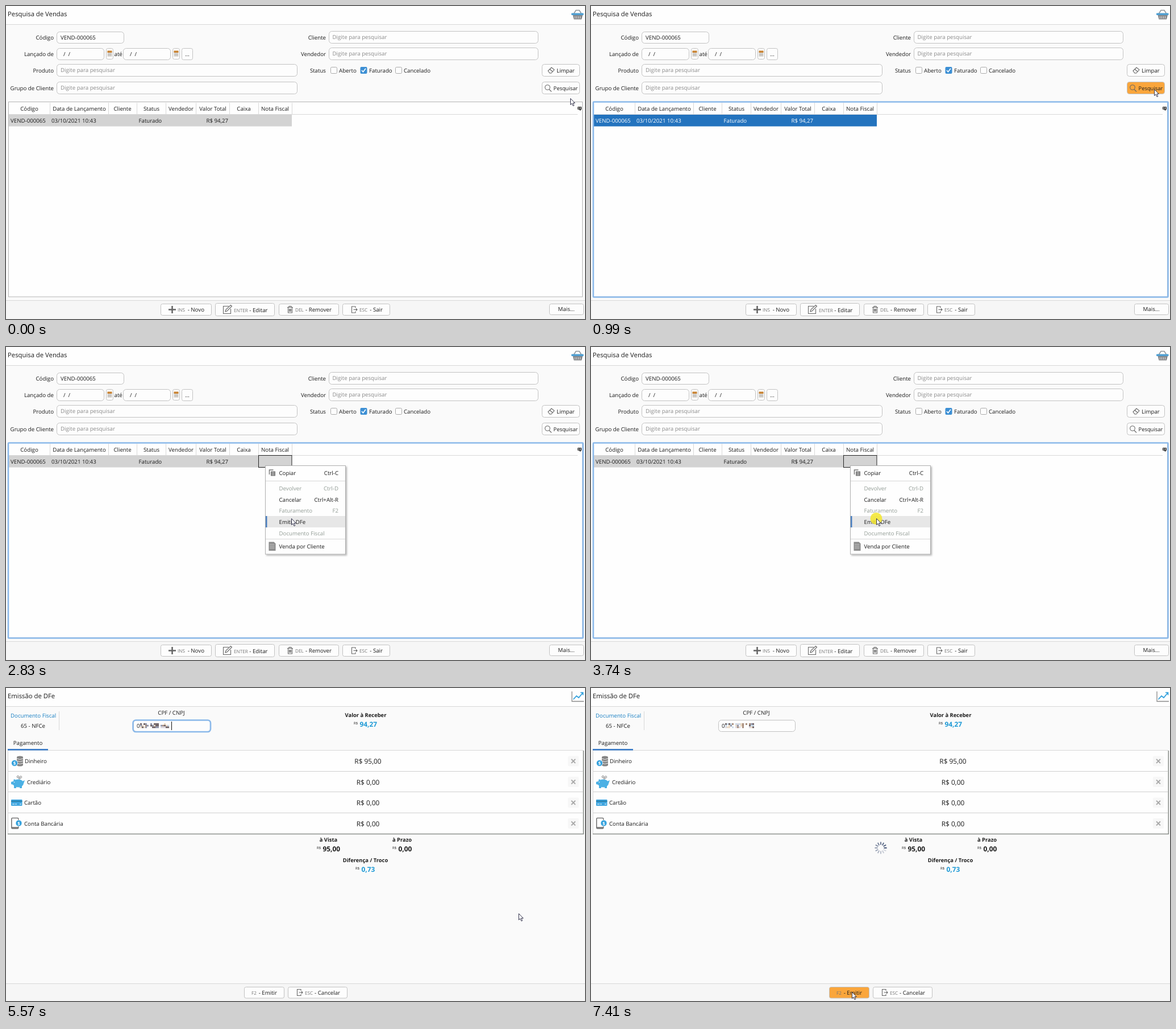
An HTML page for the animation above (8 s loop, 1019 by 550 pixels).

```html
<!DOCTYPE html>
<html lang="pt">
<head>
<meta charset="utf-8">
<title>Pesquisa de Vendas</title>
<style>
html, body { margin: 0; width: 100%; height: 100%; overflow: hidden; background: #fafafa; }
svg.stage {
  display: block; width: 1019px; height: 550px;
  font: 9.7px "Open Sans", "Noto Sans", sans-serif;
  text-rendering: geometricPrecision;
  --sales: 1; --find: #fdfdfd; --busy: 0; --focus: 0; --rowbg: #d3d3d3; --rowink: #1c1c1c;
  --menu: 0; --over: 0; --click: 0; --caret: 1; --id1: 0; --id2: 0; --id3: 0;
  --cpf: 1; --emit: #fdfdfd; --sending: 0; --mouse: 993px, 162px;
  animation: story 8s step-end infinite;
}
@keyframes story {
  0% { --sales: 1; --find: #fdfdfd; --busy: 0; --focus: 0; --rowbg: #d3d3d3; --rowink: #1c1c1c;
    --menu: 0; --over: 0; --click: 0; --caret: 1; --id1: 0; --id2: 0; --id3: 0;
    --cpf: 1; --emit: #fdfdfd; --sending: 0; --mouse: 993px, 162px; }
  .875% { --find: #faa63c; --busy: 1; --mouse: 991px, 146px; }
  12.375% { --busy: 0; --focus: 1; --rowbg: #2373be; --rowink: #fff; }
  23.875% { --find: #fdfdfd; --rowbg: #d3d3d3; --rowink: #1c1c1c; --menu: 1; --mouse: 456px, 208px; }
  35.375% { --over: 1; --mouse: 502px, 301px; }
  46.75% { --click: 1; }
  58.25% { --sales: 0; --click: 0; }
  69.625% { --caret: 0; --id1: 1; --mouse: 902px, 396px; }
  81.125% { --id1: 0; --id2: 1; --emit: #faa63c; --mouse: 460px, 528px; }
  92.625% { --id2: 0; --id3: 1; --cpf: 0; --sending: 1; --mouse: 459px, 534px; }
}
text { fill: #1c1c1c; }
.title { font-size: 11.3px; }
.e { text-anchor: end; }
.m { text-anchor: middle; }
.key { font-size: 8.2px; fill: #777; }
.hint { fill: #8b8b8b; }
.off { fill: #929c95; }
.box { fill: #fdfdfd; stroke: #c2c2c2; }
.rule { stroke: #d8d8d8; fill: none; }
.ring { fill: none; stroke: #8bb9ea; stroke-width: 2.6; }
.ico { fill: none; stroke: #666; stroke-width: 1.1; }
.row text { fill: var(--rowink); }
.b { font-weight: 700; font-size: 9.4px; text-anchor: middle; }
.sum { font-weight: 700; font-size: 11.9px; }
.cur { font-size: 6px; }
.val { font-size: 11.9px; text-anchor: middle; }
.blue { fill: #1e9ad6; }
.mouse { transform: translate(var(--mouse)); }
.spin line { stroke: #34466b; stroke-width: 2; stroke-linecap: round; }
</style>
</head>
<body>
<svg class="stage" viewBox="0 0 1019 550">
<defs>
  <g id="cal">
    <rect class="box" x=".5" y=".5" width="12" height="19" rx="3"/>
    <rect x="2.5" y="5" width="8" height="10" fill="#d9d5d0"/>
    <rect x="2.5" y="4.500" width="8" height="3.500" fill="#c98332"/>
    <path d="M3 10.500h7M3 12.500h7" stroke="#aaa" stroke-width=".6"/>
  </g>
  <g id="exit" class="ico">
    <path d="M7 3V.5H.5v11H7V9M3.500 6H10M8 4l2 2-2 2"/>
  </g>
  <g id="close">
    <rect x="-9.500" y="-9" width="19" height="18" rx="2" fill="#f7f7f7"/>
    <path d="M-3.500-3.500l7 7m0-7l-7 7" stroke="#a9a9a9" stroke-width="1.800"/>
  </g>
  <g id="coin">
    <circle r="5.500" fill="#2f9fdc" stroke="#fff" stroke-width=".8"/>
    <text y="3" class="m" style="fill:#fff;font-size:8px;font-weight:700">$</text>
  </g>
  <filter id="soft" x="-10%" y="-10%" width="125%" height="125%">
    <feDropShadow dx="2" dy="2" stdDeviation="1.500" flood-opacity=".28"/>
  </filter>
</defs>

<rect width="1019" height="550" fill="#fafafa"/>
<rect width="1019" height="32" fill="#fefefe"/>
<path class="rule" d="M0 32.500H1019"/>

<g style="opacity:var(--sales)">
  <text class="title" x="3" y="17.500">Pesquisa de Vendas</text>
  <path d="M999 14l4-6.500h6l4 6.500" fill="none" stroke="#8e959b" stroke-width="1.500"/>
  <path d="M997.500 16h17.500l-2 7.500h-13.500z" fill="#87898c"/>
  <path d="M1001.500 18v4m3-4v4m3-4v4m3-4v4" stroke="#dedede"/>
  <rect x="995" y="12.500" width="21.500" height="3.500" rx="1" fill="#4f9fd2"/>

  <g class="e">
    <text x="84" y="58.500">Código</text>
    <text x="84" y="87.500">Lançado de</text>
    <text x="84" y="116.500">Produto</text>
    <text x="84" y="147.500">Grupo de Cliente</text>
    <text x="563" y="58.500">Cliente</text>
    <text x="563" y="87.500">Vendedor</text>
    <text x="563" y="116.500">Status</text>
  </g>
  <g class="box">
    <rect x="89.500" y="45.500" width="118" height="20" rx="5"/>
    <rect x="89.500" y="74.500" width="83" height="20" rx="5"/>
    <rect x="206.500" y="74.500" width="83" height="20" rx="5"/>
    <rect x="309.500" y="74.500" width="19" height="20" rx="3"/>
    <rect x="89.500" y="102.500" width="423" height="21" rx="5"/>
    <rect x="89.500" y="133.500" width="423" height="21" rx="5"/>
    <rect x="568.500" y="44.500" width="368" height="21" rx="5"/>
    <rect x="568.500" y="73.500" width="368" height="21" rx="5"/>
    <rect x="943.500" y="102.500" width="66" height="21" rx="4"/>
    <rect x="943.500" y="133.500" width="66" height="21" rx="4" style="fill:var(--find)"/>
    <rect x="571.500" y="107.500" width="11" height="11" rx="2" stroke="#aaa"/>
    <rect x="685.500" y="107.500" width="11" height="11" rx="2" stroke="#aaa"/>
  </g>
  <rect x="623.500" y="107" width="12" height="12" rx="2" fill="#3c8fd4"/>
  <path d="M626 113l2.500 2.800 4.500-6" fill="none" stroke="#fff" stroke-width="1.600"/>
  <use href="#cal" x="176" y="74"/>
  <use href="#cal" x="293" y="74"/>

  <text x="96" y="58.500">VEND-000065</text>
  <text x="101" y="88">/&#160;&#160;/</text>
  <text x="218" y="88">/&#160;&#160;/</text>
  <text x="190.500" y="87.500">até</text>
  <text class="m" x="319" y="87.500">...</text>
  <g>
    <text class="hint" x="96" y="116">Digite para pesquisar</text>
    <text class="hint" x="96" y="147">Digite para pesquisar</text>
    <text class="hint" x="574.500" y="58">Digite para pesquisar</text>
    <text class="hint" x="574.500" y="87">Digite para pesquisar</text>
  </g>
  <text x="586" y="116.500">Aberto</text>
  <text x="639" y="116.500">Faturado</text>
  <text x="700" y="116.500">Cancelado</text>
  <path class="ico" d="M954 114l6-6 5 4-5.500 6h-2.500zM957 111l5 4.500"/>
  <text x="969" y="116.500">Limpar</text>
  <g class="ico"><circle cx="953" cy="143" r="4.300"/><path d="M956 146.500l4 4"/></g>
  <text x="963.500" y="147.500" font-size="9.400">Pesquisar</text>

  <rect x="4.500" y="168.500" width="1010" height="342.500" fill="#fefefe" stroke="#b4b4b4"/>
  <rect x="5" y="191" width="498" height="20.500" style="fill:var(--rowbg)"/>
  <path class="rule" d="M5 190.500H1006M77.500 170v20M180.500 170v20M230.500 170v20M281.500 170v20M334.500 170v20M393.500 170v20M444.500 170v20M503.500 170v20"/>
  <g class="m">
    <text x="41" y="184">Código</text>
    <text x="129" y="184">Data de Lançamento</text>
    <text x="205" y="184">Cliente</text>
    <text x="256" y="184">Status</text>
    <text x="308" y="184">Vendedor</text>
    <text x="364" y="184">Valor Total</text>
    <text x="418.500" y="184">Caixa</text>
    <text x="473.500" y="184">Nota Fiscal</text>
  </g>
  <g class="row">
    <text x="8" y="205">VEND-000065</text>
    <text x="80" y="205">03/10/2021 10:43</text>
    <text x="233.500" y="205">Faturado</text>
    <text class="e" x="391" y="205">R$ 94,27</text>
  </g>
  <path d="M1006.500 177.500h6v4h-6zM1006.500 179.500h6M1009.500 177v4" fill="none" stroke="#222"/>
  <path d="M1008 181h5l-2.500 3z" fill="#222"/>
  <rect class="ring" x="4" y="168.500" width="1011.500" height="343" rx="1" style="opacity:var(--focus)"/>

  <rect y="517" width="1019" height="33" fill="#f6f6f6"/>
  <path class="rule" d="M0 517.500H1019"/>
  <g class="box">
    <rect x="272.500" y="523.500" width="89" height="20" rx="3"/>
    <rect x="368.500" y="522.500" width="104" height="22" rx="3"/>
    <rect x="480.500" y="523.500" width="105" height="20" rx="3"/>
    <rect x="592.500" y="523.500" width="83" height="20" rx="3"/>
    <rect x="956.500" y="523.500" width="60" height="19" rx="3"/>
  </g>
  <path d="M286 533.500h13M292.500 527v13" stroke="#666" stroke-width="2.600"/>
  <path class="ico" d="M392 527.500h-9.500v13h13V532M386 537l1-3.500 8.500-8 2 2-8.500 8.500z"/>
  <path class="ico" d="M495 529.500h10M498 529v-1.500h4v1.500M496.500 530v9h7v-9M498.500 532v5m1.500-5v5m1.500-5v5"/>
  <use href="#exit" x="608" y="527.500"/>
  <text class="key" x="302" y="537">INS</text>
  <text class="key" x="401" y="537.500">ENTER</text>
  <text class="key" x="509" y="537">DEL</text>
  <text class="key" x="622" y="537">ESC</text>
  <g class="e">
    <text x="349" y="537">- Novo</text>
    <text x="460.500" y="537.500">- Editar</text>
    <text x="573" y="537">- Remover</text>
    <text x="663" y="537">- Sair</text>
    <text x="1000.500" y="536">Mais...</text>
  </g>
  <g style="opacity:var(--busy)"><g class="spin" transform="translate(510 265)"></g></g>

  <g style="opacity:var(--menu)">
    <rect x="444.500" y="190.500" width="58.500" height="21" fill="none" stroke="#222"/>
    <rect x="456.500" y="208.500" width="141" height="155.500" fill="#fefefe" stroke="#b0b0b0" filter="url(#soft)"/>
    <g style="opacity:var(--over)">
      <rect x="457" y="297" width="140" height="20" fill="#e7e7e7"/>
      <rect x="457" y="297" width="2.500" height="20" fill="#4a7fc0"/>
    </g>
    <path class="rule" d="M457 235.500h140M457 337.500h140"/>
    <path d="M463.500 224v-8h7" fill="none" stroke="#777" stroke-width="1.500"/>
    <rect x="466" y="218.500" width="8" height="8" fill="#777"/>
    <path d="M467.500 220.500h5m-5 2h5m-5 2h5" stroke="#ddd" stroke-width=".7"/>
    <path d="M462.500 342.500h9l3 3v12.500h-12z" fill="#8a8a8a"/>
    <path d="M464 346.500h8.500m-8.500 2.500h8.500m-8.500 2.500h8.500m-8.500 2.500h8.500" stroke="#d5d5d5" stroke-width=".8"/>
    <text x="480.500" y="225">Copiar</text>
    <text class="off" x="480.500" y="252">Devolver</text>
    <text x="480.500" y="271.500">Cancelar</text>
    <text class="off" x="480.500" y="291">Faturamento</text>
    <text x="480.500" y="310.500">Emitir DFe</text>
    <text class="off" x="480.500" y="330.500">Documento Fiscal</text>
    <text x="480.500" y="354">Venda por Cliente</text>
    <g class="e">
      <text x="585" y="225">Ctrl-C</text>
      <text class="off" x="585" y="252">Ctrl-D</text>
      <text x="585" y="271.500">Ctrl+Alt-R</text>
      <text class="off" x="585" y="291">F2</text>
    </g>
  </g>
</g>

<g style="opacity:calc(1 - var(--sales))">
  <text class="title" x="3" y="17.500">Emissão de DFe</text>
  <path d="M996 6v17.500h21" fill="none" stroke="#8a8a8a" stroke-width="1.300"/>
  <path d="M998.500 20l5.500-6 4 3 7-8.500M1011 8h4.500v4.500" fill="none" stroke="#2f9fdc" stroke-width="1.700"/>
  <text x="8" y="52" style="fill:#1a80c4">Documento Fiscal</text>
  <text class="m" x="47.500" y="70">65 - NFCe</text>
  <path class="rule" d="M93.500 41v33"/>
  <text class="m" x="291" y="47">CPF / CNPJ</text>
  <rect class="box" x="224.500" y="56.500" width="135" height="20" rx="5"/>
  <rect class="ring" x="223.500" y="56.500" width="136.500" height="20.500" rx="5" style="opacity:var(--cpf)"/>
  <path d="M230.500 59v15" stroke="#111" style="opacity:var(--caret)"/>
  <text x="230" y="70" style="opacity:calc(1 - var(--caret))">0</text>
  <g class="mosaic" style="opacity:var(--id1)"><path d="M291.500 59v15" stroke="#111"/></g>
  <g class="mosaic" style="opacity:var(--id2)"></g>
  <g class="mosaic" style="opacity:var(--id3)"></g>

  <text class="b" x="633" y="51">Valor à Receber</text>
  <text class="cur" x="612" y="64">R$</text>
  <text class="sum blue" x="622.500" y="68">94,27</text>
  <text class="m" x="38.500" y="100">Pagamento</text>

  <rect x="3" y="110" width="1013" height="146" fill="#fefefe"/>
  <path class="rule" d="M3 109.500H1016M3.500 110v146"/>
  <path d="M4 146.500H1015M4 182.500H1015M4 219.500H1015" stroke="#cfcfcf"/>
  <path d="M3 256.500H1016.300V110" fill="none" stroke="#8b8f8b" stroke-width="1.600"/>
  <rect x="3" y="107" width="71" height="2.600" fill="#3b7cc9"/>

  <path d="M24.500 122v13" stroke="#858585" stroke-width="11"/>
  <ellipse cx="24.500" cy="121.500" rx="5.500" ry="2" fill="#858585"/>
  <ellipse cx="24.500" cy="135.500" rx="5.500" ry="2" fill="#858585"/>
  <path d="M19 124q5.500 3 11 0m-11 4q5.500 3 11 0m-11 4q5.500 3 11 0" fill="none" stroke="#eee"/>
  <use href="#coin" x="15" y="132"/>
  <ellipse cx="21.500" cy="167.500" rx="9.500" ry="7" fill="#4bb0e4"/>
  <path d="M9 165l4-1 1-4 5 3v8l-3 1-3-2-4-1zM14 171h4v5h-4zM24 171h4v5h-4zM29 164l4-2-2 6z" fill="#4bb0e4"/>
  <circle cx="14.500" cy="165.500" r=".8" fill="#fff"/>
  <g fill="none" stroke="#858585"><circle cx="21" cy="156" r="1.700"/><circle cx="26" cy="156.500" r="1.700"/><circle cx="23.500" cy="159" r="1.200"/></g>
  <rect x="9" y="196" width="19.500" height="11" rx="1" fill="#3fa5df"/>
  <path d="M9 199h19.500" stroke="#24779f" stroke-width="1.600"/>
  <path d="M11 204h4m1 0h3m5 0h3" stroke="#fff"/>
  <rect x="9.800" y="228.500" width="12" height="18.500" rx="1.500" fill="#fff" stroke="#777" stroke-width="1.600"/>
  <path d="M10 245.500h12" stroke="#777" stroke-width="2.500"/>
  <use href="#coin" x="22.500" y="237.500"/>

  <text x="33" y="132">Dinheiro</text>
  <text x="37" y="168.500">Crediário</text>
  <text x="32" y="205">Cartão</text>
  <text x="32" y="241.500">Conta Bancária</text>
  <text class="val" x="637" y="133">R$ 95,00</text>
  <text class="val" x="637" y="169.500">R$ 0,00</text>
  <text class="val" x="637" y="206">R$ 0,00</text>
  <text class="val" x="637" y="242.500">R$ 0,00</text>
  <use href="#close" x="998.500" y="128.500"/>
  <use href="#close" x="998.500" y="165"/>
  <use href="#close" x="998.500" y="201.500"/>
  <use href="#close" x="998.500" y="238"/>

  <text class="b" x="567.500" y="270">à Vista</text>
  <text class="cur" x="547" y="283">R$</text>
  <text class="sum" x="557.500" y="287">95,00</text>
  <text class="b" x="697" y="270">à Prazo</text>
  <text class="cur" x="680" y="283">R$</text>
  <text class="sum" x="690.500" y="287">0,00</text>
  <text class="b" x="632.500" y="306">Diferença / Troco</text>
  <text class="cur" x="615" y="319">R$</text>
  <text class="sum blue" x="625.500" y="323">0,73</text>

  <rect y="519" width="1019" height="31" fill="#f6f6f6"/>
  <path class="rule" d="M0 519.500H1019"/>
  <rect class="box" x="419.500" y="525.500" width="70" height="19.500" rx="3" style="fill:var(--emit)"/>
  <rect class="box" x="496.500" y="525.500" width="104" height="19.500" rx="3"/>
  <text class="key" x="432" y="538.500">F2</text>
  <text class="e" x="477" y="538.500">- Emitir</text>
  <use href="#exit" x="512" y="529"/>
  <text class="key" x="526" y="538.500">ESC</text>
  <text class="e" x="588" y="538.500">- Cancelar</text>
  <g style="opacity:var(--sending)"><g class="spin" transform="translate(510 281)"></g></g>
</g>

<circle cx="502" cy="301.500" r="10.500" fill="#f3e62b" style="opacity:calc(var(--click) * .85)"/>
<path class="mouse" d="M.5.500V11.500L3 9.200l2 4.300 1.800-.8-1.900-4.200H8.300z" fill="#fff" stroke="#20203c" stroke-width=".9"/>
</svg>
<script>
const add = (parent, tag, attrs) => {
  const el = document.createElementNS("http://www.w3.org/2000/svg", tag);
  for (const k in attrs) el.setAttribute(k, attrs[k]);
  parent.append(el);
};

// Twelve spokes fading behind the leading one
for (const g of document.querySelectorAll(".spin"))
  for (let i = 0; i < 12; i++)
    add(g, "line", { y1: -6.2, y2: -9.8, transform: `rotate(${90 - i * 30})`, opacity: 0.9 - i * 0.065 });

// Blurred digits as seeded blocks
const tints = ["#6b5f62", "#a58a78", "#c8d9e8", "#e9d8c2", "#8d93a8", "#d8d4dc"];
document.querySelectorAll(".mosaic").forEach((g, n) => {
  let seed = 17 + n * 91;
  const rnd = () => (seed = (seed * 16807) % 2147483647) / 2147483647;
  for (let i = 0; i < 54; i++) {
    const col = i % 18, fill = tints[Math.floor(rnd() * tints.length)];
    if (col % 6 < 5 && rnd() < 0.78)
      add(g, "rect", { x: 236 + col * 3, y: 62 + Math.floor(i / 18) * 2.8, width: 3, height: 2.8, fill });
  }
});
</script>
</body>
</html>
```
